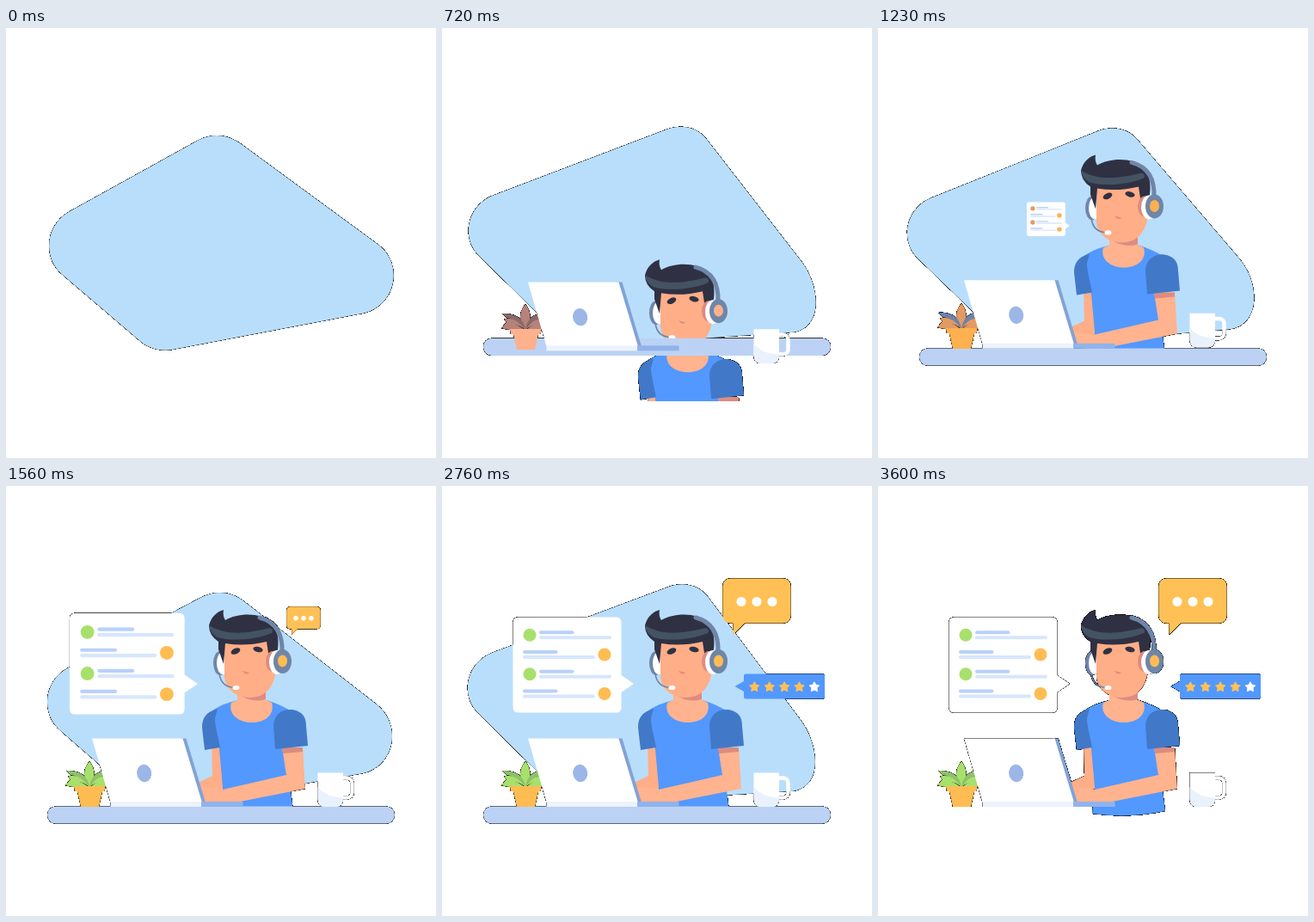
Animation of 500 by 500 pixels, one loop 3630 ms. Source, as an HTML page:

```html
<!DOCTYPE html>
<html lang="en">
<head>
<meta charset="utf-8">
<title>Support desk</title>
<style>
  html, body { margin: 0; width: 100%; height: 100%; overflow: hidden; background: #fff; }
  svg { display: block; width: 500px; height: 500px; }
  .blue { fill: #5398ff; } .navy { fill: #4179c8; } .hair { fill: #2f3143; }
  .skin { fill: #ffb38f; } .face { fill: #ffae87; } .shade { fill: #dc8c80; }
  .steel { fill: #6f86a9; } .white { fill: #fff; } .sun { fill: #ffc155; }
  .amber { fill: var(--amber); } .leaf { fill: var(--leaf); } .dark { fill: var(--dark); }
  .line { fill: none; stroke-linecap: round; }
</style>
</head>
<body>
<svg viewBox="0 0 500 500">
  <defs>
    <!-- Soft edges against the empty stage turn into a thin black line. -->
    <filter id="matte" filterUnits="userSpaceOnUse" x="0" y="0" width="500" height="500" color-interpolation-filters="sRGB">
      <feComponentTransfer in="SourceAlpha" result="black"><feFuncA type="linear" slope="20" intercept="-1"/></feComponentTransfer>
      <feMerge><feMergeNode in="black"/><feMergeNode in="SourceGraphic"/></feMerge>
    </filter>
    <clipPath id="floor"><rect width="500" height="434"/></clipPath>
  </defs>

  <g filter="url(#matte)">
    <path id="blob" fill="#b9defc"/>

    <g clip-path="url(#floor)">
      <g id="man">
        <path class="face" d="M239 300H252V352L228 362L223 345L240 337Z"/>
        <path class="blue" d="M240 261Q254 252 270 249H303Q319 254 332 262L325 306L334 378Q292 387 249 381L252 350L248 306Z"/>
        <path class="skin" d="M262 252C258 265 270 275 286 275C301 275 313 266 309 252L301 248V232H269V249Z"/>
        <path class="shade" d="M269 236H302V248Q286 253 270 242Z"/>
        <path class="navy" d="M246 259C232 263 228 270 228 281L231 307L249 304C247 292 243 280 243 270Z"/>
        <path class="skin" d="M321 304H345L348 352L262 369Q228 370 226 366V350Q240 350 252 353L326 336Z"/>
        <path class="shade" d="M321 304H345V309L322 311Z"/>
        <path class="navy" d="M311 279C311 266 321 259 333 260C345 262 349 269 349 279L351 302L313 306Z"/>

        <ellipse class="steel" cx="249" cy="206" rx="8" ry="14"/>
        <ellipse class="white" cx="252" cy="206" rx="7" ry="13"/>
        <path class="face" d="M254 176L254 222C255 236 267 246 284 246C302 246 313 232 314 212L314 176Z"/>
        <path class="hair" d="M236 162C239 151 246 146 253 144C252 149 253 153 255 156C270 147 296 147 309 158C317 167 318 184 315 194L306 201L303 181Q278 187 255 183L253 207L247 190V181Q236 174 236 162Z"/>
        <path fill="#445362" d="M236 162C258 176 286 170 307 165Q312 168 309 171C288 180 259 180 246 176Q237 171 236 162Z"/>
        <ellipse class="hair" cx="267" cy="192" rx="5.700" ry="3.300" transform="rotate(-25 267 192)"/>
        <ellipse class="hair" cx="293" cy="190" rx="5.700" ry="3.100" transform="rotate(14 293 190)"/>
        <path class="shade" d="M275 215L283 217Q279 221 275 215Z"/>
        <path class="line" stroke="#6f86a9" stroke-width="5" d="M295 153C314 158 322 173 321 194"/>
        <ellipse class="shade" cx="310" cy="204" rx="8" ry="12"/>
        <ellipse class="white" cx="315" cy="205" rx="9" ry="14"/>
        <ellipse class="steel" cx="321.500" cy="204" rx="10.500" ry="14"/>
        <ellipse class="amber" cx="321.500" cy="203.500" rx="5.500" ry="7"/>
        <path class="line" stroke="#6f86a9" stroke-width="1.700" d="M248 218Q250 234 266 234.500"/>
        <ellipse class="white" cx="267.500" cy="234.500" rx="4" ry="2.600"/>
      </g>

      <g id="desk"><rect x="48" y="372.400" width="404" height="20.200" rx="10" fill="#bcd2f4"/></g>

      <g id="plant">
        <path class="leaf" d="M97 351Q82 337 69 348Q78 351 97 351ZM97 351Q110 338 118 349ZM97 351Q85 335 97 320Q108 334 97 351Z"/>
        <path class="dark" d="M97 350Q94 330 70 331L75 336Q84 336 97 350ZM97 350Q100 330 119 331L115 337Q106 338 97 350Z"/>
        <path class="leaf" d="M97 350Q84 333 72 338L75 341L69 348Q85 339 97 350ZM97 350Q108 334 117 339V348Q107 341 97 350Z"/>
        <path class="amber" d="M79 349H115.500L114.500 355H112L108 373H87L83 355H80Z"/>
      </g>

      <g id="laptop">
        <path fill="#82a2d6" d="M203 293.400H209.500L232 368H226Z"/>
        <path class="white" d="M100 293.400H205.500L228 368H121.500Z"/>
        <path fill="#edf3fd" d="M121.500 367H228V373H121.500Z"/>
        <path fill="#90b3eb" d="M227 367H275.500V373H227Z"/>
        <ellipse cx="160.700" cy="334" rx="8.500" ry="10.200" fill="#9cb6e7" transform="rotate(-10 160.700 334)"/>
      </g>

      <g id="mug">
        <rect class="line" x="387" y="339.500" width="15.500" height="23" rx="6" stroke="#fff" stroke-width="4.500"/>
        <path class="white" d="M362.500 333.400H392V364Q392 373 383 373H371Q362.500 373 362.500 364Z"/>
        <path fill="#e9f1fd" d="M362.500 350Q372 362 392 362.500V364Q392 373 383 373H371Q362.500 373 362.500 364Z"/>
      </g>
    </g>

    <g id="chat">
      <path class="white" d="M88.500 152.500H202.500Q208.500 152.500 208.500 158.500V220L223 230L208.500 240V257.500Q208.500 263.500 202.500 263.500H88.500Q82.500 263.500 82.500 257.500V158.500Q82.500 152.500 88.500 152.500Z"/>
    </g>

    <g id="bubble">
      <path class="sun" d="M336 107.400H396Q405.600 107.400 405.600 117V150Q405.600 159.600 396 159.600H352L338.500 173V159.600H336Q326.400 159.600 326.400 150V117Q326.400 107.400 336 107.400Z"/>
      <g class="white"><circle cx="348" cy="134.500" r="5.500"/><circle cx="366" cy="134.500" r="5.500"/><circle cx="384" cy="134.500" r="5.500"/></g>
    </g>

    <g id="rating">
      <path class="blue" d="M353 218.400H443Q445 218.400 445 220.400V245.600Q445 247.600 443 247.600H353Q351 247.600 351 245.600V239L340.500 233L351 227V220.400Q351 218.400 353 218.400Z"/>
    </g>
  </g>
</svg>

<script>
const LOOP = 3630;
const $ = id => document.getElementById(id);
const clamp = x => Math.min(1, Math.max(0, x));
const add = (id, markup) => $(id).insertAdjacentHTML('beforeend', markup);

for (let row = 0; row < 4; row++) {
  const y = 173.300 + row * 22.700, left = row % 2 === 0, x = left ? 115 : 96;
  const bar = (dy, length, color) =>
    `<path class="line" stroke="${color}" stroke-width="4" d="M${x} ${y + dy}h${length}"/>`;
  add('chat', `<circle class="${left ? 'leaf' : 'amber'}" cx="${left ? 102 : 189}" cy="${y}" r="7.500"/>`
    + bar(-3, 36.5, '#b9d1f8') + bar(3, 80, '#d7e6fc'));
}

for (let i = 0; i < 5; i++) {
  const points = Array.from({ length: 10 }, (_, k) => {
    const r = k % 2 ? 3.2 : 6, a = k * Math.PI / 5;
    return [363.3 + i * 17.4 + r * Math.sin(a), 233.8 - r * Math.cos(a)];
  });
  const color = i < 4 ? '#ffc155' : '#fff';
  add('rating', `<polygon points="${points.join(' ')}" fill="${color}" stroke="${color}" stroke-linejoin="round"/>`);
}

// Ease out; overshoot 0 is a plain cubic.
function backOut(t, start, duration, overshoot) {
  const q = clamp((t - start) / duration) - 1;
  return 1 + (overshoot + 1) * q ** 3 + overshoot * q * q;
}

function swing(p) {
  const half = x => 2 ** 1.7 * x ** 2.7;
  return p < .5 ? half(p) : 1 - half(1 - p);
}

// Start and end of each rounded corner, clockwise from the left, in both poses.
const rest = [[65.7, 287], [73.5, 213.5], [223.5, 130.5], [271.5, 133.6],
  [432.4, 251.6], [414, 332], [193.4, 374], [155.8, 364]];
const swung = [[42, 264], [59, 193.5], [264, 117], [309, 128.5],
  [417, 272], [405, 355], [174, 369], [137, 358]];

function blobPath(u) {
  const pts = rest.map(([x, y], i) => [x + (swung[i][0] - x) * u, y + (swung[i][1] - y) * u]);
  const angle = (a, b) => Math.atan2(b[1] - a[1], b[0] - a[0]);
  let d = '';
  for (let i = 0; i < 8; i += 2) {
    const [p, q] = [pts[i], pts[i + 1]];
    const a = angle(pts[(i + 7) % 8], p), b = angle(q, pts[(i + 2) % 8]);
    const turn = (b - a + 2 * Math.PI) % (2 * Math.PI);
    const h = Math.hypot(q[0] - p[0], q[1] - p[1]) * 2 / 3 * Math.tan(turn / 4) / Math.sin(turn / 2);
    d += `${i ? 'L' : 'M'}${p}C${p[0] + h * Math.cos(a)} ${p[1] + h * Math.sin(a)} `
      + `${q[0] - h * Math.cos(b)} ${q[1] - h * Math.sin(b)} ${q}`;
  }
  return d + 'Z';
}

const rises = [ // id, start, duration, distance, overshoot
  ['desk', 303, 800, 62, 2.5],
  ['plant', 420, 830, 115, 1.7],
  ['laptop', 425, 830, 141, 1.7],
  ['mug', 515, 800, 101, 1.7],
  ['man', 485, 966, 290, 0],
];
const pops = [ // id, start, anchor
  ['chat', 1170, 223, 230],
  ['bubble', 1470, 326, 173],
  ['rating', 1770, 340.5, 233],
];

function tint(t) {
  const [amber, leaf, dark] = t < 1000 ? ['#ffb08c', '#b5837a', '#8a6868']
    : t < 1400 ? ['#ffb04f', '#e39a63', '#6d83ab'] : ['#ffbc52', '#a8e06c', '#8fc06c'];
  const style = document.documentElement.style;
  style.setProperty('--amber', amber);
  style.setProperty('--leaf', leaf);
  style.setProperty('--dark', dark);
}

function draw(now) {
  const t = now % LOOP;
  const beat = t / LOOP * 4 % 2;
  $('blob').setAttribute('d', blobPath(swing(beat < 1 ? beat : 2 - beat)));

  for (const [id, start, duration, distance, overshoot] of rises) {
    const y = distance * (1 - backOut(t, start, duration, overshoot));
    $(id).setAttribute('transform', `translate(0 ${y})`);
    $(id).style.display = t < start ? 'none' : '';
  }
  for (const [id, start, x, y] of pops) {
    const s = backOut(t, start, 650, 1.3);
    $(id).setAttribute('transform', `translate(${x} ${y}) scale(${s}) translate(${-x} ${-y})`);
    $(id).style.display = t <= start ? 'none' : '';
  }

  // The backdrop and desk drop out just before the loop restarts.
  const ended = t >= 3600;
  $('blob').style.display = ended ? 'none' : '';
  if (ended) $('desk').style.display = 'none';
  tint(t);
  requestAnimationFrame(draw);
}
requestAnimationFrame(draw);
</script>
</body>
</html>
```
